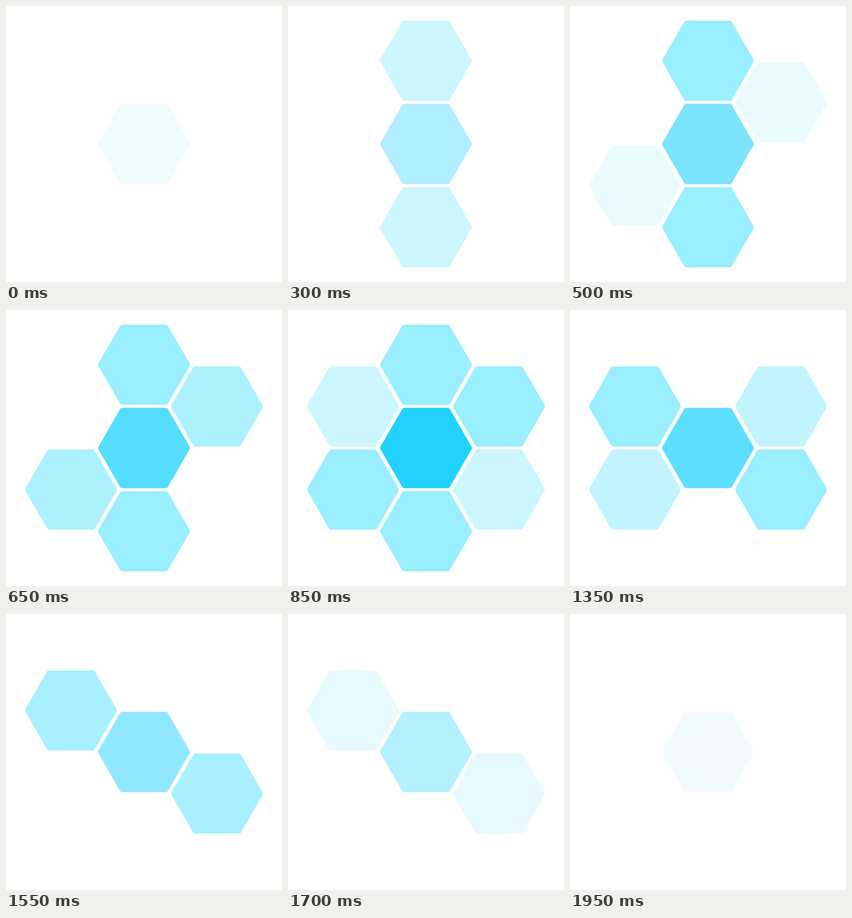
An HTML page that plays this animation: 541x541 px, repeating every 2150 ms.

```html
<!DOCTYPE html>
<html lang="en">
<head>
<meta charset="utf-8">
<title>Honeycomb loader</title>
<style>
  html, body { margin: 0; width: 100%; height: 100%; overflow: hidden; background: #fff; }
  svg { display: block; width: 100%; height: 100%; }
  path { stroke-width: 12; stroke-linejoin: round; }
</style>
</head>
<body>
<svg id="stage" viewBox="0 0 541 541"></svg>
<script>
const LOOP = 2150, FADE = 250;
const stage = document.getElementById('stage');
const clamp = v => Math.max(0, Math.min(1, v));

// The round stroke turns the inner hexagon into one with soft corners.
function hexagon(x, y, color) {
  const points = Array.from({ length: 6 }, (_, i) => {
    const a = i * Math.PI / 3;
    return `${x + 83.9 * Math.cos(a)} ${y + 83.9 * Math.sin(a)}`;
  });
  const path = document.createElementNS('http://www.w3.org/2000/svg', 'path');
  path.setAttribute('d', `M${points.join('L')}Z`);
  path.setAttribute('fill', color);
  path.setAttribute('stroke', color);
  return stage.appendChild(path);
}

// Three opposite pairs, listed in the order they appear.
const pairs = [[0, -163.2], [143.2, -81.6], [-143.2, -81.6]].map(([dx, dy]) =>
  [1, -1].map(k => hexagon(270.5 + k * dx, 270.5 + k * dy, '#9ef')));
const center = hexagon(270.5, 270.5, '#0cf');

// 50 ms ticks with rests at both ends and at the peak.
function tick(t) {
  if (t < 150) return 50;
  if (t >= 1950) return 1950;
  if (t >= 1750) return 1750 + Math.floor((t - 1750) / 100) * 100;
  if (t >= 950 && t < 1150) return 950;
  return Math.floor(t / 50) * 50;
}

function draw(t) {
  center.style.opacity = clamp(Math.min(t / 980, (2000 - t) / 1030));
  pairs.forEach((pair, i) => {
    const rise = (t - 175 - i * 275) / FADE;
    const fall = 1 - (t - 988 - i * 261) / FADE;
    for (const hex of pair) hex.style.opacity = clamp(Math.min(rise, fall));
  });
}

const start = performance.now();
function frame() {
  draw(tick((performance.now() - start) % LOOP));
  requestAnimationFrame(frame);
}
frame();
</script>
</body>
</html>
```
